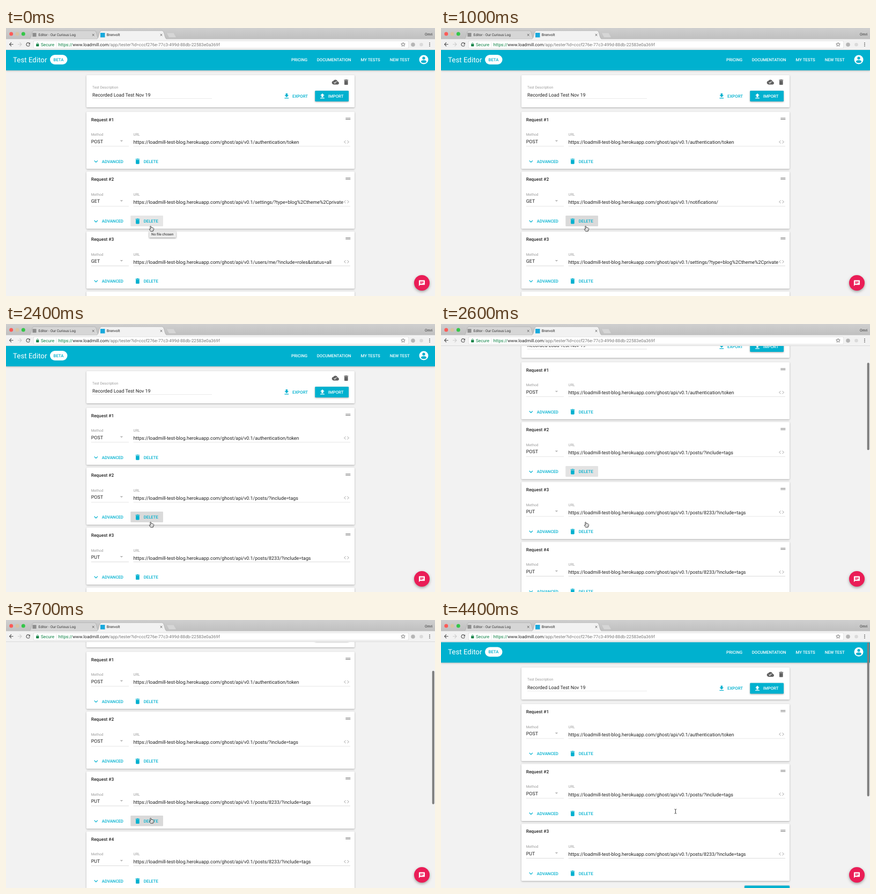
Recreate the animation shown at these times as an HTML page with a canvas. Size 800x500 px, loop 5100 ms.

```html
<!DOCTYPE html>
<html lang="en">
<head>
<meta charset="utf-8">
<title>Test Editor</title>
<style>
html, body { margin: 0; width: 100%; height: 100%; overflow: hidden; background: #f2f2f2; }
canvas { display: block; width: 800px; height: 500px; }
</style>
</head>
<body>
<canvas id="stage" width="800" height="500"></canvas>
<script>
const ctx = document.getElementById('stage').getContext('2d');
ctx.textRendering = 'geometricPrecision';

const LOOP = 5100, STEP = 100, TOP = 41, PITCH = 111.7, CARD = 156.3;
const CYAN = '#00b1cf', INK = '#212121', GREY = '#9a9a9a';

// Lengths in the page are CSS pixels at 5/9 size.
const px = n => n * 5 / 9;

const icons = {
  cloud: 'M19.35 10.04C18.67 6.59 15.64 4 12 4 9.11 4 6.6 5.64 5.35 8.04 2.34 8.36 0 10.91 0 14c0 3.31 2.69 6 6 6h13c2.76 0 5-2.24 5-5 0-2.64-2.05-4.78-4.65-4.96zM10 17l-3.5-3.5 1.41-1.41L10 14.17 15.18 9l1.41 1.41z',
  trash: 'M6 19c0 1.1.9 2 2 2h8c1.1 0 2-.9 2-2V7H6zM19 4h-3.5l-1-1h-5l-1 1H5v2h14z',
  down: 'M19 9h-4V3H9v6H5l7 7zM5 18v2h14v-2z',
  up: 'M9 16h6v-6h4l-7-7-7 7h4zM5 18h14v2H5z',
  chat: 'M20 2H4c-1.1 0-2 .9-2 2v18l4-4h14c1.1 0 2-.9 2-2V4c0-1.1-.9-2-2-2zM6 9h12v2H6zM14 14H6v-2h8zM18 8H6V6h12z',
  star: 'M12 2l2.8 6.7 7.2.6-5.5 4.7 1.7 7L12 17.3 5.8 21l1.7-7L2 9.300l7.200-.6z'
};
for (const k in icons) icons[k] = new Path2D(icons[k]);

function icon(name, x, y, color, size = 13.33, outline) {
  ctx.save();
  ctx.translate(x - size / 2, y - size / 2);
  ctx.scale(size / 24, size / 24);
  if (outline) {
    ctx.strokeStyle = color;
    ctx.lineWidth = 2;
    ctx.stroke(icons[name]);
  } else {
    ctx.fillStyle = color;
    ctx.fill(icons[name], 'evenodd');
  }
  ctx.restore();
}

function text(s, x, y, size, color = INK, weight = 400) {
  ctx.font = `${weight} ${size}px Roboto, sans-serif`;
  ctx.fillStyle = color;
  ctx.fillText(s, x, y);
  return x + ctx.measureText(s).width;
}

function rect(x, y, w, h, color, r = 0) {
  ctx.fillStyle = color;
  ctx.beginPath();
  ctx.roundRect(x, y, w, h, r);
  ctx.fill();
}

function disc(x, y, r, color) {
  ctx.fillStyle = color;
  ctx.beginPath();
  ctx.arc(x, y, r, 0, Math.PI * 2);
  ctx.fill();
}

function poly(points, color, width) {
  ctx.beginPath();
  points.forEach(([x, y]) => ctx.lineTo(x, y));
  if (width) {
    ctx.strokeStyle = color;
    ctx.lineWidth = width;
    ctx.stroke();
  } else {
    ctx.fillStyle = color;
    ctx.fill();
  }
}

function shadowed(blur, dy, alpha, draw) {
  ctx.save();
  ctx.shadowColor = `rgba(0,0,0,${alpha})`;
  ctx.shadowBlur = blur;
  ctx.shadowOffsetY = dy;
  draw();
  ctx.restore();
}

const API = 'https://loadmill-test-blog.herokuapp.com/ghost/api/v0.1/';
const SETTINGS = ['GET', 'settings/?type=blog%2Ctheme%2Cprivate'];
const requests = [
  ['POST', 'authentication/token'],
  SETTINGS,
  ['GET', 'users/me/?include=roles&status=all'],
  ['GET', 'posts/?page=1&limit=15&status=all&staticPages=all&include=tags'],
  ['GET', 'notifications/'],
  SETTINGS,
  ['GET', 'tags/?limit=all'],
  ['POST', 'posts/?include=tags'],
  ...Array(6).fill(['PUT', 'posts/8233/?include=tags'])
];
const second = [200, 500, 800, 1200, 1600, 2000];
const third = [2900, 3100, 3300, 3500, 3900];
const deletes = [...second, ...third];

function listAt(t) {
  const list = requests.slice();
  second.forEach(d => d <= t && list.splice(1, 1));
  third.forEach(d => d <= t && list.splice(2, 1));
  return list;
}

const clamp = v => Math.min(1, Math.max(0, v));

function scrollAt(t) {
  const down = 97 * (1 - Math.pow(1 - clamp((t - 2400) / 300), 1.9));
  const u = clamp((t - 4100) / 300);
  return down - 97.5 * u * u * (3 - 2 * u);
}

function header() {
  shadowed(3, 1, .25, () => rect(0, TOP, 800, 38, CYAN));
  text('Test Editor', 13, 63.500, px(24), '#fff');
  rect(82, 50, 32.5, 18, '#fff', 9);
  text('BETA', 88.5, 61.8, px(14), CYAN, 500);
  [['PRICING', 532], ['DOCUMENTATION', 579.7], ['MY TESTS', 661.5], ['NEW TEST', 715.7]]
    .forEach(([s, x]) => text(s, x, 62.3, px(14), '#fff', 500));
  disc(779, 59, 8.5, '#fff');
  disc(779, 56.2, 2.6, CYAN);
  ctx.beginPath();
  ctx.ellipse(779, 62.600, 5, 2.700, 0, 0, Math.PI * 2);
  ctx.fill();
}

function summary(t) {
  shadowed(3, 1, .3, () => rect(150, 88, 500, 60, '#fff', 1.5));
  text('Test Description', 161, 112.8, px(12), GREY);
  text('Recorded Load Test Nov 19', 161, 128, px(16));
  rect(161, 131.5, 223, .6, '#d8d8d8');
  const saving = deletes.some(d => t >= d && t < d + 200);
  if (saving) disc(620, 101, 1, '#555');
  else icon('cloud', 614.3, 101, '#616161');
  icon('trash', 634.3, 101, '#616161');
  icon('down', 523.3, 127, CYAN);
  text('EXPORT', 534, 129.8, px(14), CYAN, 500);
  shadowed(3, 1, .35, () => rect(576.3, 117, 62.7, 20, CYAN, 1.2));
  icon('up', 590, 127, '#fff');
  text('IMPORT', 600.700, 129.8, px(14), '#fff', 500);
}

function highlight(y, color, t) {
  ctx.save();
  ctx.beginPath();
  ctx.roundRect(232.3, y, 60.7, 20, 1.2);
  ctx.clip();
  rect(232, y, 62, 20, color);
  for (const d of deletes) {
    const age = t - d + 100;
    if (age >= 0 && age < 300) disc(270, y + 16, 9 + .17 * age, `rgba(0,0,0,${age < 200 ? .1 : .05})`);
  }
  ctx.restore();
}

// Which delete button is lit, and how strongly
function litAt(t) {
  if (t < 2500) return [1, t < 100 ? '#e6e6e6' : '#dadada'];
  if (t < 2700) return [1, '#e3e3e3'];
  if (t < 4000) return [2, t < 2800 ? '#e6e6e6' : '#d9d9d9'];
  return [-1];
}

function card(i, [method, path], t) {
  const y = CARD + i * PITCH;
  shadowed(3, 1, .3, () => rect(150, y, 500, 106.5, '#fff', 1.5));
  text('Request #' + (i + 1), 158.7, y + 17.2, px(15), INK, 500);
  for (const dy of [11.300, 13.7]) rect(633.3, y + dy, 9, 1, '#757575');
  text('Method', 158.7, y + 44.9, px(12), GREY);
  text('URL', 237.6, y + 44.9, px(12), GREY);
  text(method, 158.7, y + 58.3, px(16));
  poly([[212.6, y + 53.3], [218.2, y + 53.3], [215.4, y + 56]], '#b5b5b5');
  rect(158.7, y + 63.900, 70.5, .6, '#cfcfcf');
  rect(237.6, y + 63.900, 404.4, .6, '#cfcfcf');

  ctx.save();
  ctx.beginPath();
  ctx.rect(237, y + 46, 404.5, 18);
  ctx.clip();
  const end = text(API + path, 237.4, y + 60, px(16));
  ctx.restore();
  if (end < 640) {
    const cy = y + 56.3;
    for (const s of [-1, 1])
      poly([[635 + s * 1.6, cy - 2.7], [635 + s * 4.2, cy], [635 + s * 1.6, cy + 2.7]], '#858585', .8);
  }

  const [lit, color] = litAt(t);
  if (lit === i) highlight(y + 82, color, t);
  poly([[164.7, y + 91], [167.8, y + 94.2], [170.9, y + 91]], CYAN, 1.2);
  text('ADVANCED', 178.8, y + 95.3, px(14), CYAN, 500);
  icon('trash', 245.4, y + 92.4, CYAN);
  text('DELETE', 256.700, y + 95.3, px(14), CYAN, 500);
}

function page(t) {
  const list = listAt(t), scroll = scrollAt(t), view = 500 - TOP;
  rect(0, TOP, 800, view, '#f2f2f2');
  ctx.save();
  ctx.beginPath();
  ctx.rect(0, TOP, 800, view);
  ctx.clip();
  ctx.save();
  ctx.translate(0, -scroll);
  header();
  summary(t);
  list.forEach((r, i) => card(i, r, t));
  const y = CARD + list.length * PITCH + 3.6;
  shadowed(3, 1, .35, () => rect(566, y, 84, 20, CYAN, 1.2));
  ctx.restore();

  if (t >= 2500) {
    const full = 399 + list.length * PITCH;
    const top = TOP + 1 + Math.max(0, scroll) * view / full;
    rect(794.7, top, 4, view * view / full, '#7d7d7d', 2);
  }
  shadowed(5, 2, .35, () => disc(775.5, 475.500, 14.5, '#ea1d57'));
  icon('chat', 775.5, 476, '#fff', 13.33);
  ctx.restore();
}

function tab(x, w, color) {
  ctx.beginPath();
  ctx.moveTo(x, 20.5);
  ctx.bezierCurveTo(x + 5, 20, x + 4, 5, x + 9, 5);
  ctx.lineTo(x + w - 9, 5);
  ctx.bezierCurveTo(x + w - 4, 5, x + w - 5, 20, x + w, 20.5);
  ctx.fillStyle = color;
  ctx.fill();
  ctx.strokeStyle = '#a5a5a5';
  ctx.lineWidth = .6;
  ctx.stroke();
}

function cross(x, y) {
  poly([[x - 1.8, y - 1.8], [x + 1.8, y + 1.8]], '#555', .9);
  poly([[x - 1.8, y + 1.8], [x + 1.8, y - 1.8]], '#555', .9);
}

function arrow(x, dir, color) {
  poly([[x - 3.5 * dir, 30.5], [x + 3.5 * dir, 30.5]], color, 1.1);
  poly([[x, 27], [x + 3.5 * dir, 30.5], [x, 34]], color, 1.1);
}

function browser() {
  const strip = ctx.createLinearGradient(0, 0, 0, 20);
  strip.addColorStop(0, '#cfcfcf');
  strip.addColorStop(1, '#c0c0c0');
  rect(0, 0, 800, 21, strip);
  [[9.700, '#fc5b57'], [21, '#d9c4a2'], [32.3, '#34c648']].forEach(([x, c]) => disc(x, 11, 3.5, c));
  tab(43, 131, '#d6d6d6');
  rect(0, 20, 800, 21, '#f2f2f2');
  rect(0, 20, 800, .6, '#a8a8a8');
  tab(169, 131, '#f2f2f2');
  rect(170, 20, 129, 1.2, '#f2f2f2');
  poly([[300, 9.5], [312.5, 9.5], [317, 17.3], [304, 17.3]], '#d6d6d6');
  rect(49.5, 9.2, 7, 7, '#8d8d8d');
  rect(176, 9, 8.500, 8.500, '#19a9dc');
  text('Editor - Our Curious Log', 60.5, 15.3, 6.6, '#333');
  text('Brenvolt', 187.7, 15.3, 6.8, '#222');
  cross(162.7, 12.9);
  cross(289.5, 12.9);
  text('Omri', 781, 13.5, 6.7, '#333');

  arrow(10, -1, '#555');
  arrow(25.5, 1, '#cfcfcf');
  ctx.beginPath();
  ctx.arc(41.200, 30.700, 3.2, .3, 5.5);
  ctx.strokeStyle = '#555';
  ctx.lineWidth = 1.1;
  ctx.stroke();
  poly([[45, 27], [45, 30.4], [41.7, 30.4]], '#555');

  rect(51, 23.7, 700, 14.2, '#d0d0d0', 2);
  rect(51.5, 24.2, 699, 13.2, '#fff', 1.5);
  const green = '#0b8043';
  rect(56.2, 30, 5.2, 4.2, green, .6);
  ctx.beginPath();
  ctx.arc(58.8, 29.7, 1.7, Math.PI, 0);
  ctx.strokeStyle = green;
  ctx.lineWidth = .9;
  ctx.stroke();
  text('Secure', 65, 33.8, 8.2, green);
  rect(93.6, 26, .6, 10, '#ddd');
  let x = text('https://', 97.6, 33.8, 8.2, green);
  x = text('www.loadmill.com', x, 33.8, 8.2, '#222');
  text('/app/tester?id=cccf276e-77c3-499d-88db-22583e0a369f', x, 33.8, 8.2, '#777');
  icon('star', 740.5, 30.7, '#555', 9, true);
  disc(759, 31, 3.8, '#b5b5b5');
  disc(774.5, 31, 3.3, '#dadada');
  for (const y of [27.8, 30.7, 33.6]) disc(790, y, .9, '#555');
  rect(0, 40.4, 800, .6, '#c4c4c4');
}

function hand(x, y) {
  ctx.save();
  ctx.translate(x, y);
  ctx.beginPath();
  ctx.moveTo(-1.8, 1.5);
  ctx.lineTo(-2.6, -3.8);
  ctx.quadraticCurveTo(-1.7, -5.4, -.8, -3.8);
  ctx.lineTo(-.3, -1.2);
  ctx.quadraticCurveTo(3.8, -1.7, 4.3, .2);
  ctx.lineTo(3.8, 3);
  ctx.lineTo(2.8, 5.2);
  ctx.lineTo(-1.5, 5.2);
  ctx.lineTo(-4, 1.400);
  ctx.quadraticCurveTo(-3.8, 0, -1.8, 1.5);
  ctx.fillStyle = '#fff';
  ctx.fill();
  ctx.strokeStyle = '#222';
  ctx.lineWidth = .9;
  ctx.stroke();
  for (const dx of [.4, 2]) poly([[dx, 1.4], [dx, 3.600]], '#222', .5);
  ctx.restore();
}

function beam(x, y) {
  poly([[x, y - 3.5], [x, y + 3.5]], '#222', .9);
  for (const s of [-1, 1])
    poly([[x - 2, y + 4.2 * s], [x, y + 3.5 * s], [x + 2, y + 4.2 * s]], '#222', .8);
}

function cursor(t) {
  const u = clamp((t - 3900) / 400);
  const x = 271.3 + 166 * u, y = 374 - 17 * u;
  if (u > 0) beam(x, y);
  else hand(x, y);
}

function tooltip() {
  shadowed(3, 1, .45, () => rect(267, 379.3, 50, 11.7, '#ececec', .5));
  text('No file chosen', 271, 387.3, 6.5, '#222');
}

function frame(now) {
  const t = Math.floor((now % LOOP) / STEP) * STEP;
  page(t);
  browser();
  if (t < 100) tooltip();
  cursor(t);
}

const start = performance.now();
function tick() {
  frame(performance.now() - start);
  requestAnimationFrame(tick);
}
tick();
</script>
</body>
</html>
```
